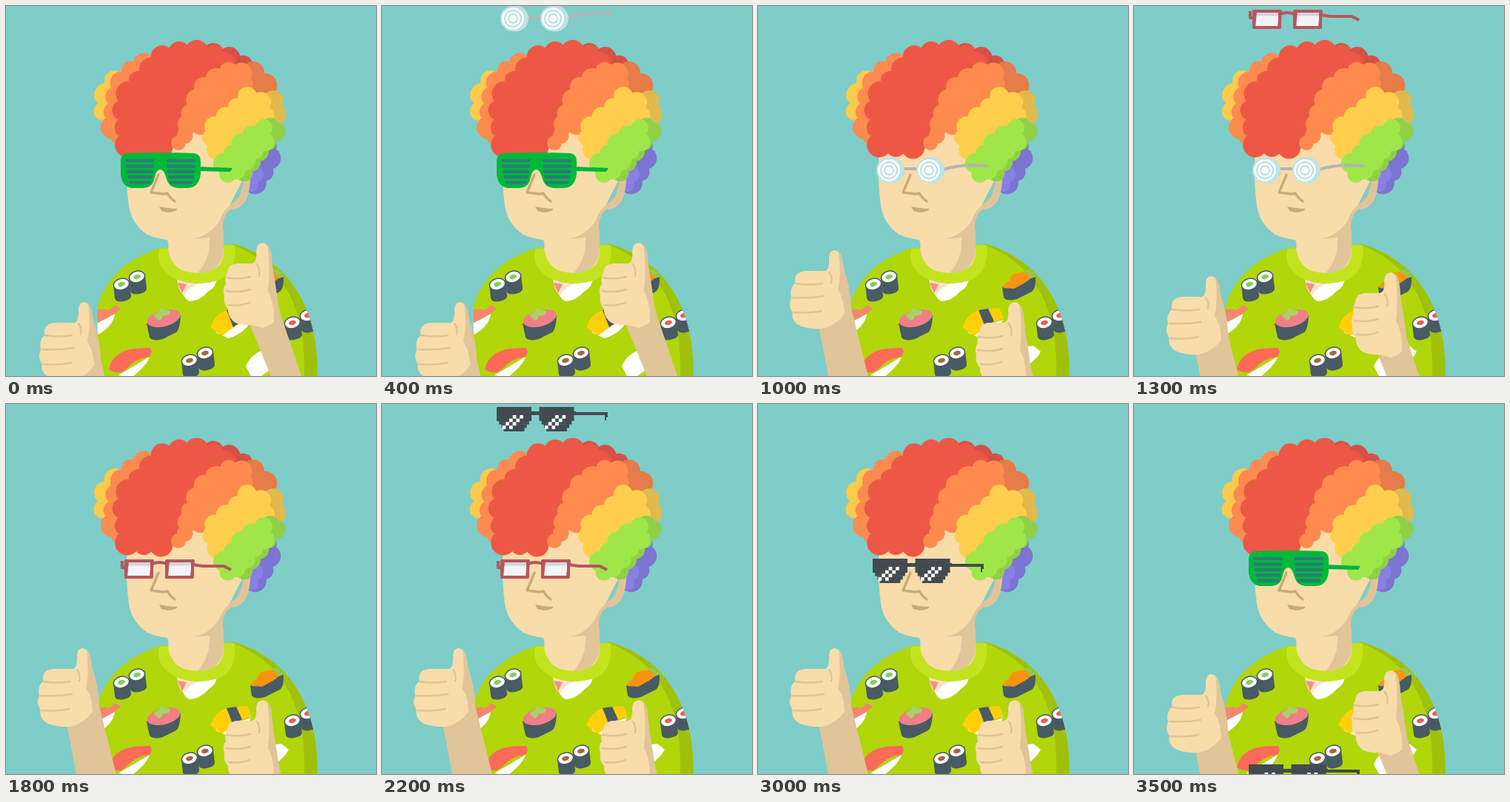
These frames come from a looping animation (500x500 px, 3600 ms). An HTML page:

```html
<!DOCTYPE html>
<html lang="en">
<head>
<meta charset="utf-8">
<title>Thumbs up, new glasses</title>
<style>
  html, body { margin: 0; width: 100%; height: 100%; overflow: hidden; background: #7ecdc8; }
  svg { display: block; width: 100vw; height: 100vh; }
  .skin { fill: #f8dcaa; }
  .shade { fill: #e0c599; }
  .crease { fill: none; stroke: #dfc496; stroke-width: 2.4; stroke-linecap: round; }
  .feature { fill: none; stroke: #c9ab79; stroke-width: 3.4; stroke-linecap: round; stroke-linejoin: round; }
  .nori { fill: #485a63; }
  .rice { fill: #fff; }

  /* Each pair drops in, bounces, rests, then drops out when the next one arrives. */
  .glasses { animation: drop 3600ms step-end infinite; }
  .round { animation-delay: -3200ms; }
  .red { animation-delay: -2300ms; }
  .pixel { animation-delay: -1400ms; }
  .slats { animation-delay: -500ms; }
  @keyframes drop {
    0% { transform: translateY(-205px); animation-timing-function: steps(3); }
    8.332% { transform: translateY(72px); }
    8.333% { transform: translateY(3px); }
    11.111% { transform: translateY(0); }
    27.777% { transform: translateY(2px); animation-timing-function: steps(5); }
    41.666% { transform: translateY(462px); }
    41.667%, 100% { transform: translateY(600px); }
  }

  .hand { animation: 400ms steps(2) infinite; }
  .left { animation-name: left; }
  .right { animation-name: right; }
  @keyframes left {
    0%, 100% { transform: translate(1px, 35px); }
    50% { transform: translate(-1px, -35px); }
  }
  @keyframes right {
    0%, 100% { transform: translateY(-40px); }
    50% { transform: translateY(40px); }
  }
</style>
</head>
<body>
<svg viewBox="0 0 500 500">
  <defs>
    <clipPath id="body"><path id="torso" d="M208 327C165 341 134 366 123 408L125 500H421Q421 478 418 455C405 370 352 334 308 322Z"/></clipPath>
  </defs>

  <use href="#torso" fill="#b1d60a"/>
  <g clip-path="url(#body)">
    <path d="M305 322C350 340 408 380 403 500H425V320Z" fill="#9fc10c"/>
    <g id="rolls"></g>

    <!-- prawn -->
    <path class="rice" d="M121 428L147 416Q144 434 124 444Z"/>
    <path d="M118 412Q130 408 139 411L148 404L155 409L148 415Q139 421 120 430Z" fill="#f4886a"/>

    <!-- tuna boat -->
    <path class="nori" d="M190 429L194 448Q199 454 212 450L230 441Q235 437 236 418Z"/>
    <ellipse cx="213" cy="422" rx="23" ry="11" transform="rotate(-14 213 422)" fill="#f27f86"/>
    <path d="M204 418L218 414M211 412L207 421" stroke="#a5d265" stroke-width="7" stroke-linecap="round"/>

    <!-- salmon -->
    <path class="rice" d="M152 499L194 474Q192 484 170 502Z"/>
    <path d="M139 491Q144 460 195 462Q199 467 194 474Q176 476 165 488Q153 501 139 491Z" fill="#ff6b57"/>

    <!-- under the collar -->
    <path class="rice" d="M236 381L285 368Q284 380 274 385Q262 399 248 399Q240 396 236 381Z"/>
    <path d="M231 368L270 372Q248 378 241 390Q233 388 231 368Z" fill="#fbe3c8"/>
    <path d="M232 374L244 376L238 388Z" fill="#f58f7c"/>

    <!-- egg -->
    <path class="rice" d="M283 441L331 424Q325 441 301 449Z"/>
    <path d="M276 434Q282 417 297 411L326 408L332 422Q313 428 292 446Z" fill="#ffcf08"/>
    <path class="nori" d="M298 411L311 409L319 426L307 434Z"/>

    <!-- roe boat -->
    <path d="M356 360L367 355L376 367L370 374Z" fill="#92cc4b"/>
    <path class="nori" d="M330 380L332 394Q337 400 350 396L370 386Q376 382 375 366Z"/>
    <path d="M331 381Q334 372 340 372Q340 362 350 361Q363 357 367 365Q375 367 346 382Z" fill="#fb9312"/>

    <path class="rice" d="M324 487Q333 463 372 459L382 467Q377 479 345 500H331Z"/>
  </g>

  <g id="back"></g>

  <!-- neck, collar, head -->
  <path d="M207 328Q202 352 224 366Q253 382 289 370Q313 358 309 323Z" fill="#c3e31f"/>
  <path class="skin" d="M216 312Q221 320 219 328Q222 350 240 358Q267 365 285 353Q296 345 294 321L292 275Z"/>
  <path class="shade" d="M272 308L292 280L294 321Q296 345 280 356Q270 361 259 361Q277 340 275 312Z"/>
  <path class="skin" d="M164 195Q161 235 166 270Q170 295 191 309Q215 320 252 315Q281 311 294 286L330 215L290 165H190Z"/>
  <path class="shade" d="M330 215Q332 247 324 263Q317 275 303 275Q293 283 292 302L275 313L252 315Q276 310 288 291Q295 273 310 263Q321 254 320 227Z"/>
  <path class="feature" d="M206 228L196 252L213 254L218 253Q222 260 228 264"/>
  <path d="M207 271Q222 274 231 274Q232 278 218 279L210 277Z" fill="#c9ab79"/>

  <g id="front"></g>

  <g class="hand left">
    <path class="shade" d="M80 452L97 540H151L127 443L122 412L90 400Z"/>
    <path class="skin" d="M51 404Q52 394 65 393H88Q98 396 97 374Q98 365 105 365Q114 367 115 381L119 404Q126 420 125 440Q111 466 88 471Q65 472 54 465Q45 456 48 449Q41 440 46 429Q43 417 51 410Z"/>
    <path class="shade" d="M110 367Q116 374 117 389Q127 421 127 443L118 459Q119 434 109 418Q114 397 110 367Z"/>
    <path class="crease" d="M52 410Q72 413 88 410M48 429Q72 430 90 427M50 449Q70 451 87 447M97 394Q102 401 100 409"/>
  </g>

  <g class="hand right">
    <path class="shade" d="M325 460L358 540L373 580H413L368 448L350 430Z"/>
    <path class="skin" d="M299 400Q300 389 312 388H329Q340 389 338 371Q339 360 348 360Q357 363 358 380L361 415Q366 436 368 450Q371 467 347 475L332 471Q313 472 306 465Q299 457 300 449Q293 442 295 432Q292 422 297 416Q295 407 299 400Z"/>
    <path class="shade" d="M353 362Q359 367 360 389L369 450L374 470L362 475Q364 443 354 425Q358 393 353 362Z"/>
    <path class="crease" d="M298 407Q314 410 330 406M297 425Q315 428 330 423M301 444Q316 446 329 441M339 389Q344 397 342 405"/>
  </g>

  <g class="glasses round" id="discs">
    <path d="M196 220H216M250 221Q274 213 309 216" fill="none" stroke="#b5b5b5" stroke-width="4" stroke-linecap="round"/>
  </g>

  <g class="glasses red" fill="none" stroke="#b8555b" stroke-width="4" stroke-linejoin="round">
    <g id="lens">
      <rect x="162" y="212" width="35" height="22" fill="#f3f3f7"/>
      <path d="M164 216H195" stroke="#d3d5dc" stroke-width="5"/>
      <path d="M162 234L164 212H198L196 234Z"/>
    </g>
    <use href="#lens" x="55"/>
    <path d="M157 212V221H162M198 216Q207 212 217 216M253 217L265 219H294L304 224"/>
  </g>

  <g class="glasses pixel" id="pixels" fill="#434a50">
    <path d="M200 215H262V220H200ZM258 216H305V223H303V227H301V220H258Z"/>
  </g>

  <g class="glasses slats">
    <path d="M258 217L306 219L303 224L258 223Z" fill="#00b33f"/>
    <path d="M163 199Q208 197 255 199Q263 201 263 210V227Q261 245 246 246H232Q220 245 217 234Q214 221 208 221Q203 221 200 235Q197 246 184 246H170Q157 244 155 228V208Q156 200 163 199Z" fill="#00b83b"/>
    <g id="slots" stroke="#2b7c74" stroke-width="4.2"></g>
  </g>
</svg>
<script>
  const add = (id, markup) => document.getElementById(id).insertAdjacentHTML('beforeend', markup);

  // A curly tuft: a filled outline with round curls strung evenly along it.
  function tuft(layer, color, size, outline) {
    add(layer, `<g fill="${color}"><path d="${outline}Z"/></g>`);
    const group = document.getElementById(layer).lastElementChild;
    const path = group.firstElementChild;
    const length = path.getTotalLength();
    const count = Math.round(length / (size * 1.55));
    let curls = '';
    for (let i = 0; i < count; i++) {
      const { x, y } = path.getPointAtLength(length * i / count);
      curls += `<circle cx="${x}" cy="${y}" r="${size * (1 + 0.12 * Math.sin(i * 2.4))}"/>`;
    }
    group.insertAdjacentHTML('beforeend', curls);
  }

  tuft('back', '#7c74d0', 14, 'M352 188L359 198L346 233L335 240L332 215');
  tuft('back', '#8880e6', 10, 'M334 212L338 225L332 243');
  tuft('front', '#ffcb4c', 14, 'M147 101L134 120L130 147L150 155L165 120');
  tuft('front', '#fe8b50', 14, 'M207 74L172 82L150 112L145 140L143 173L165 180L195 120');
  tuft('front', '#d85045', 14, 'M280 64L320 76L322 86L290 90');
  tuft('front', '#e57c49', 15, 'M334 90L351 108L345 122L318 108');
  tuft('front', '#e0ba4a', 14, 'M361 128L365 146L350 156L342 132');
  tuft('front', '#ed5845', 15, 'M234 63Q276 58 297 75L245 145L226 179L208 192L164 189L158 142L168 108L190 94L208 69');
  tuft('front', '#ff8a4e', 13, 'M267 109L305 84L325 94L320 110L258 165L241 158L254 134');
  tuft('front', '#ff8a4e', 10, 'M233 185L246 170');
  tuft('front', '#ffce4d', 13, 'M326 122L344 130L352 148L320 174L285 195L273 170L303 145');
  tuft('front', '#8fd046', 12, 'M357 163L367 162L362 178L335 203L322 226');
  tuft('front', '#9fe748', 12, 'M348 165L350 183L322 211L303 232L291 215L320 181');

  function roll(x, y, filling) {
    add('rolls', `<g transform="translate(${x} ${y})">
      <path class="nori" d="M-11 1L-9 19Q-7 25 3 23Q13 21 13 16L11 -3Z"/>
      <g transform="rotate(-14)">
        <ellipse class="nori" rx="11.5" ry="8.5"/>
        <ellipse class="rice" rx="10" ry="7"/>
        <ellipse fill="${filling}" rx="5" ry="3"/>
      </g></g>`);
  }
  function rollPair(x, y, filling) {
    roll(x, y, filling);
    roll(x + 21, y - 10, filling);
  }
  rollPair(156, 376, '#86cc5c');
  rollPair(248, 479, '#a8663f');
  rollPair(387, 428, '#ef5b4f');

  for (const x of [177, 231]) {
    add('discs', `<circle cx="${x + 3.5}" cy="222" r="17.5" fill="#bfe2e6"/>
      <circle cx="${x}" cy="222" r="17" fill="#fafdfe"/>`);
    for (const r of [16, 11, 6]) {
      add('discs', `<circle cx="${x}" cy="222" r="${r}" fill="none" stroke="#b5dfe5" stroke-width="1.8"/>`);
    }
  }

  // Blocky lenses: a bar, three narrowing rows and two diagonal glints.
  const cell = 4.7;
  const block = (x, y, w, h, fill) => add('pixels', `<rect x="${x}" y="${y}" width="${w}" height="${h}" ${fill || ''}/>`);
  for (const x of [155, 212.5]) {
    block(x, 209, 47, 19);
    for (let row = 1; row < 4; row++) block(x + 3.2 * row, 222.9 + cell * row, 47 - 6.4 * row, cell + 0.3);
    for (let row = 0; row < 4; row++) {
      for (const start of [21.6, 31]) block(x + start - cell * row, 220 + cell * row, cell, cell, 'fill="#fff"');
    }
  }

  for (let row = 0; row < 5; row++) {
    const y = 209 + row * 7.4, inset = row * row / 4;
    add('slots', `<path d="M${162 + inset} ${y}H${200 - inset}M${217 + inset} ${y}H${256 - inset}"/>`);
  }
</script>
</body>
</html>
```
